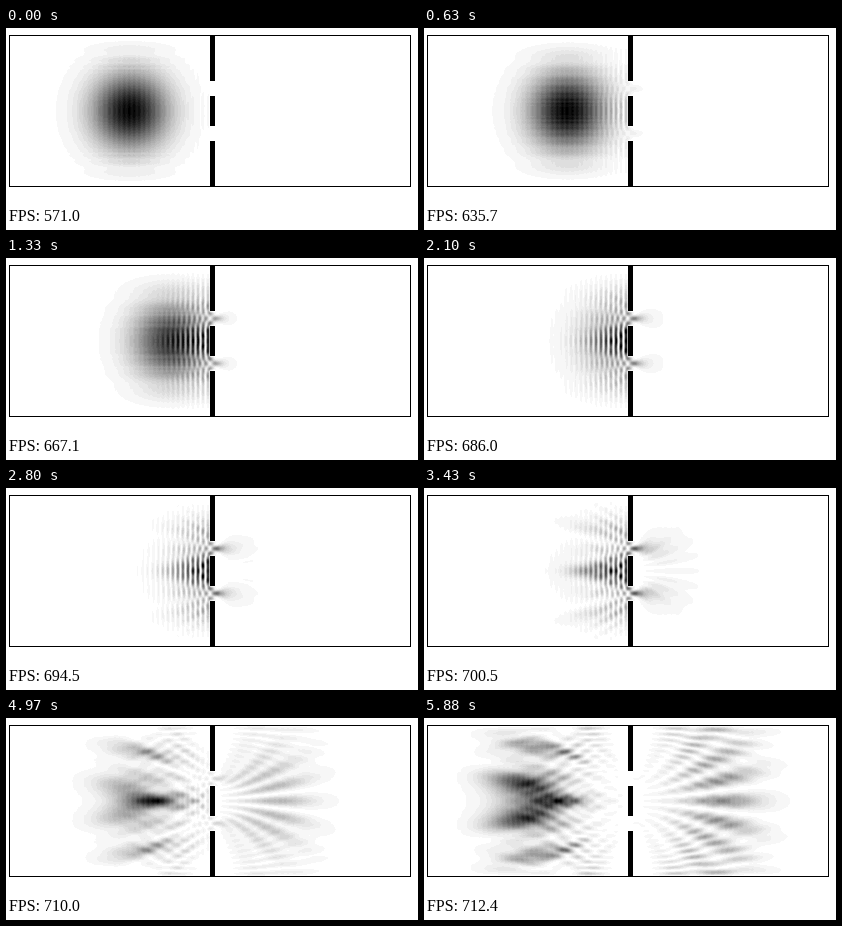
These frames come from a looping animation (412x202 px, 5950 ms). A matplotlib script:

```python
import numpy as np
import matplotlib.pyplot as plt
from matplotlib.animation import FuncAnimation
from matplotlib.patches import Rectangle

W, H = 412, 202            # stage
NX, NY = 400, 150          # simulation grid, one cell per pixel
LEFT, TOP = 4, 8           # grid origin on the stage
SLOTS, INTERVAL = 85, 70
HELD = 31                  # slot that repeats the picture before it

WALL_X, WALL_W = 200, 5
WALL_SPANS = [(0, 45), (60, 90), (105, 150)]

K = 2 * np.pi / 10         # wave number of the packet
SIGMA = 26                 # standard deviation of its density
START = (100, 75)
SPEED = 2.15               # pixels per picture
STEPS = 10
LEAD_STEPS = 93
DT = SPEED / np.sin(K) / STEPS
LEVELS = 31

open_cells = np.ones((NY, NX), np.float32)
for a, b in WALL_SPANS:
    open_cells[a:b, WALL_X:WALL_X + WALL_W] = 0


def start_packet():
    y, x = np.mgrid[:NY, :NX] + 0.5
    r2 = (x - START[0]) ** 2 + (y - START[1]) ** 2
    env = np.exp(-r2 / (4 * SIGMA ** 2)) * open_cells
    half = (1 - np.cos(K)) * DT / 2
    re, im = np.zeros((2, NY + 2, NX + 2), np.float32)
    re[1:-1, 1:-1] = env * np.cos(K * x)
    im[1:-1, 1:-1] = env * np.sin(K * x - half)
    return re, im


def hamiltonian(f):
    near = f[:-2, 1:-1] + f[2:, 1:-1] + f[1:-1, :-2] + f[1:-1, 2:]
    return 2 * f[1:-1, 1:-1] - 0.5 * near


def advance(re, im, steps):
    """Leapfrog the real and imaginary parts; the field is zero on walls."""
    gain = np.float32(DT) * open_cells
    for _ in range(steps):
        re[1:-1, 1:-1] += gain * hamiltonian(im)
        im[1:-1, 1:-1] -= gain * hamiltonian(re)


def shade(re, im):
    d = (re ** 2 + im ** 2)[1:-1, 1:-1]
    return 1 - np.round(d / d.max() * LEVELS) / LEVELS


def simulate(count):
    re, im = start_packet()
    advance(re, im, LEAD_STEPS)
    pictures = []
    for _ in range(count):
        pictures.append(shade(re, im))
        advance(re, im, STEPS)
    return pictures


# The running average of the frame time settles towards BASE_MS.
BASE_MS = 1.36
fps_at = np.array([0, 9, 19, 30, 48, 70, 83])
fps_seen = np.array([571.0, 635.7, 667.1, 686.0, 700.5, 710.0, 712.4])
settle = 1 / (1000 / fps_seen - BASE_MS)


def fps(n):
    return 1000 / (BASE_MS + 1 / np.interp(n, fps_at, settle))


pictures = simulate(SLOTS - 1)

fig = plt.figure(figsize=(W / 100, H / 100), dpi=100, facecolor="white")
ax = fig.add_axes([0, 0, 1, 1])


def box(x, y, w, h, z):
    ax.add_patch(Rectangle((x, y), w, h, facecolor="black", linewidth=0,
                           antialiased=False, zorder=z))


box(LEFT - 1, TOP - 1, NX + 2, NY + 2, 1)
image = ax.imshow(pictures[0], cmap="gray", vmin=0, vmax=1, zorder=2,
                  extent=(LEFT, LEFT + NX, TOP + NY, TOP),
                  interpolation="nearest", aspect="auto")
for a, b in WALL_SPANS:
    box(LEFT + WALL_X, TOP + a, WALL_W, b - a, 3)
label = ax.text(3, 193, "", family="Liberation Serif", fontsize=16 * 0.72,
                color="black", ha="left", va="baseline")
ax.set_xlim(0, W)
ax.set_ylim(H, 0)
ax.axis("off")


def update(slot):
    n = slot - (slot >= HELD)
    image.set_data(pictures[n])
    label.set_text(f"FPS: {fps(n):.1f}")
    return image, label


anim = FuncAnimation(fig, update, frames=SLOTS, interval=INTERVAL,
                     repeat=True, repeat_delay=0)
plt.show()
```
